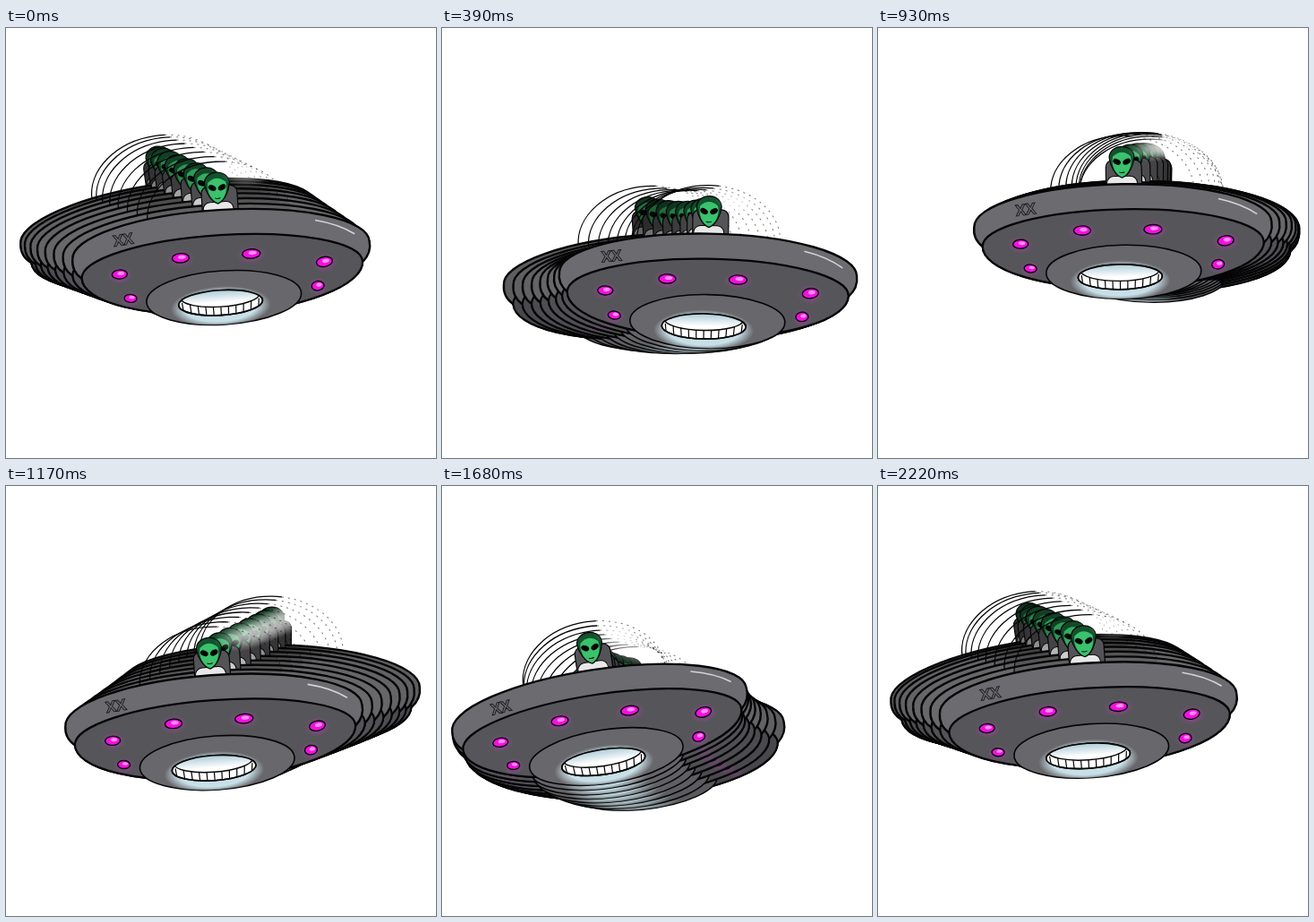
An HTML page with a canvas for the animation above (2250 ms loop, 480 by 480 pixels).

```html
<!DOCTYPE html>
<html>
<head>
<meta charset="utf-8">
<style>
  html, body { margin: 0; height: 100%; overflow: hidden; background: #fff; }
  canvas { display: block; width: 480px; height: 480px; }
</style>
</head>
<body>
<canvas id="stage" width="480" height="480"></canvas>
<script>
const ctx = document.getElementById('stage').getContext('2d');
const TAU = Math.PI * 2;
const FRAME_MS = 30, FRAMES = 75;
const COPIES = 7, COPY_LAG = TAU * 2 / FRAMES;
const INK = '#050506';

// x, y, rx, ry, tilt of the lamps under the disc
const LAMPS = [
  [-114.5, 0, 8.5, 5, 0], [-45.5, -14, 9.5, 5.2, 0], [33.5, -14, 10, 5.2, 0],
  [114.5, 0, 9, 5.5, -.12], [-104, 27.5, 7, 4.5, .12], [105.5, 26.3, 7, 5.2, -.1]
];

function paint(fill, stroke, width = 2) {
  if (fill) { ctx.fillStyle = fill; ctx.fill(); }
  if (stroke) { ctx.strokeStyle = stroke; ctx.lineWidth = width; ctx.stroke(); }
}

function ellipse(x, y, rx, ry, fill, stroke, width, tilt = 0, from = 0, to = TAU) {
  ctx.beginPath();
  ctx.ellipse(x, y, rx, ry, tilt, from, to);
  paint(fill, stroke, width);
}

// Soft elliptical glow, solid up to the fraction `core` of its radius
function glow(x, y, rx, ry, rgb, alpha, core) {
  const g = ctx.createRadialGradient(0, 0, 0, 0, 0, 1);
  g.addColorStop(core, `rgba(${rgb},${alpha})`);
  g.addColorStop(1, `rgba(${rgb},0)`);
  ctx.save();
  ctx.translate(x, y);
  ctx.scale(rx, ry);
  ellipse(0, 0, 1, 1, g);
  ctx.restore();
}

function drawPilot() {
  ctx.beginPath();
  ctx.roundRect(-18, -92, 40, 40, 8);
  paint('#5c5c61', INK, 1.2);
  ctx.beginPath();
  ctx.roundRect(-17, -74, 34, 20, 8);
  paint('#fff', INK, 1);
  ctx.beginPath();
  ctx.moveTo(0, -72);
  ctx.bezierCurveTo(-8, -75, -13, -86, -14, -95);
  ctx.bezierCurveTo(-13, -111, 13, -111, 14, -95);
  ctx.bezierCurveTo(13, -86, 8, -75, 0, -72);
  paint('#145a31', INK, 1.2);
  ctx.beginPath();
  ctx.moveTo(0, -73);
  ctx.bezierCurveTo(-8, -76, -12, -87, -10, -96);
  ctx.quadraticCurveTo(0, -105, 10, -96);
  ctx.bezierCurveTo(12, -87, 8, -76, 0, -73);
  paint('#3fd677');
  for (const side of [-1, 1])
    ellipse(side * 5.5, -90, 4.6, 3, INK, null, 0, side * -.5);
  ctx.beginPath();
  ctx.moveTo(-3, -78.5);
  ctx.quadraticCurveTo(0, -77, 3, -78.5);
  paint(null, INK, 1);
}

function drawDome() {
  // The glass only tints what is already behind it
  ctx.globalCompositeOperation = 'source-atop';
  ellipse(0, -58, 80, 61, 'rgba(0,0,0,.09)', null, 0, 0, Math.PI, TAU);
  glow(36, -104, 30, 15, '255,255,255', .45, .2);
  ctx.globalCompositeOperation = 'source-over';
  ellipse(0, -58, 80, 61, null, INK, 1.3, 0, Math.PI, 4.85);
  ctx.setLineDash([2, 5]);
  ellipse(0, -58, 80, 61, null, 'rgba(0,0,0,.55)', 1, 0, 4.85, TAU);
  ctx.setLineDash([]);
}

function drawDisc() {
  ctx.beginPath();
  ctx.ellipse(0, -20, 166, 45, 0, Math.PI, TAU);
  ctx.quadraticCurveTo(168, -7, 157, 3);
  ctx.ellipse(0, 2, 157, 49, 0, 0, Math.PI);
  ctx.quadraticCurveTo(-168, -7, -166, -20);
  paint('#6c6b6f', INK, 2.4);

  ctx.beginPath();
  ctx.ellipse(0, 2, 157, 39, 0, Math.PI, TAU);
  ctx.ellipse(0, 2, 157, 49, 0, 0, Math.PI);
  paint('#56555a', INK, 2.2);

  ctx.beginPath();
  ctx.moveTo(107, -47);
  ctx.quadraticCurveTo(133, -41, 150, -29);
  paint(null, 'rgba(255,255,255,.7)', 1.6);

  ctx.save();
  ctx.translate(-108, -37);
  ctx.rotate(-.1);
  ctx.font = 'bold 17px "Open Sans", sans-serif';
  ctx.textAlign = 'center';
  ctx.textBaseline = 'middle';
  ctx.strokeStyle = '#1a1a1c';
  ctx.lineWidth = .9;
  ctx.strokeText('XX', 0, 0);
  ctx.restore();

  for (const [x, y, rx, ry, tilt] of LAMPS) {
    glow(x, y + 1, rx * 1.7, ry * 2, '190,60,190', .4, .4);
    ellipse(x, y, rx, ry, '#f510e0', INK, 1.4, tilt);
    ellipse(x + 1.5, y - 1, rx * .45, ry * .4, '#ff8cf5', null, 0, tilt);
  }
}

function drawHub() {
  ellipse(0, 33, 86.5, 30, '#68676b', INK, 1.6);
  ctx.save();
  ctx.clip();
  glow(-4, 43, 56, 23, '205,230,238', .95, .72);
  ctx.restore();
  ellipse(-4, 38.5, 47, 14, '#fff', INK, 1.6);
  ctx.save();
  ctx.clip();
  for (let i = -5; i <= 5; i++) {
    ctx.beginPath();
    ctx.moveTo(-4 + i * 8.6, 36);
    ctx.lineTo(-4 + i * 8.2, 54);
    paint(null, INK, 1.2);
  }
  const sky = ctx.createLinearGradient(0, 24, 0, 43);
  sky.addColorStop(0, '#a9cad5');
  sky.addColorStop(.75, '#fff');
  ellipse(-4, 31, 44, 12, sky, INK, 1.4);
  ctx.restore();
  ellipse(-4, 38.5, 47, 14, null, INK, 1.6);
}

// The lag shifts the phase of both oscillations by the same amount
function drawSaucer(phase, lag) {
  const sway = Math.sin(phase - lag);
  const bob = Math.sin(2 * phase - lag);
  ctx.save();
  ctx.translate(241.2 + 62.7 * sway, 268 + 32.4 * bob);
  ctx.rotate((-3.55 + 4.95 * sway) * Math.PI / 180);
  drawPilot();
  drawDome();
  drawDisc();
  drawHub();
  ctx.restore();
}

function dimTrail() {
  ctx.globalCompositeOperation = 'source-atop';
  ctx.fillStyle = 'rgba(0,0,0,.025)';
  ctx.fillRect(0, 0, 480, 480);
  ctx.globalCompositeOperation = 'source-over';
}

function render(now) {
  const phase = TAU * (Math.floor(now / FRAME_MS) % FRAMES) / FRAMES;
  ctx.clearRect(0, 0, 480, 480);
  for (let i = COPIES; i >= 0; i--) {
    drawSaucer(phase, i * COPY_LAG);
    if (i) dimTrail();
  }
  requestAnimationFrame(() => render(performance.now() - start));
}

const start = performance.now();
render(0);
</script>
</body>
</html>
```
